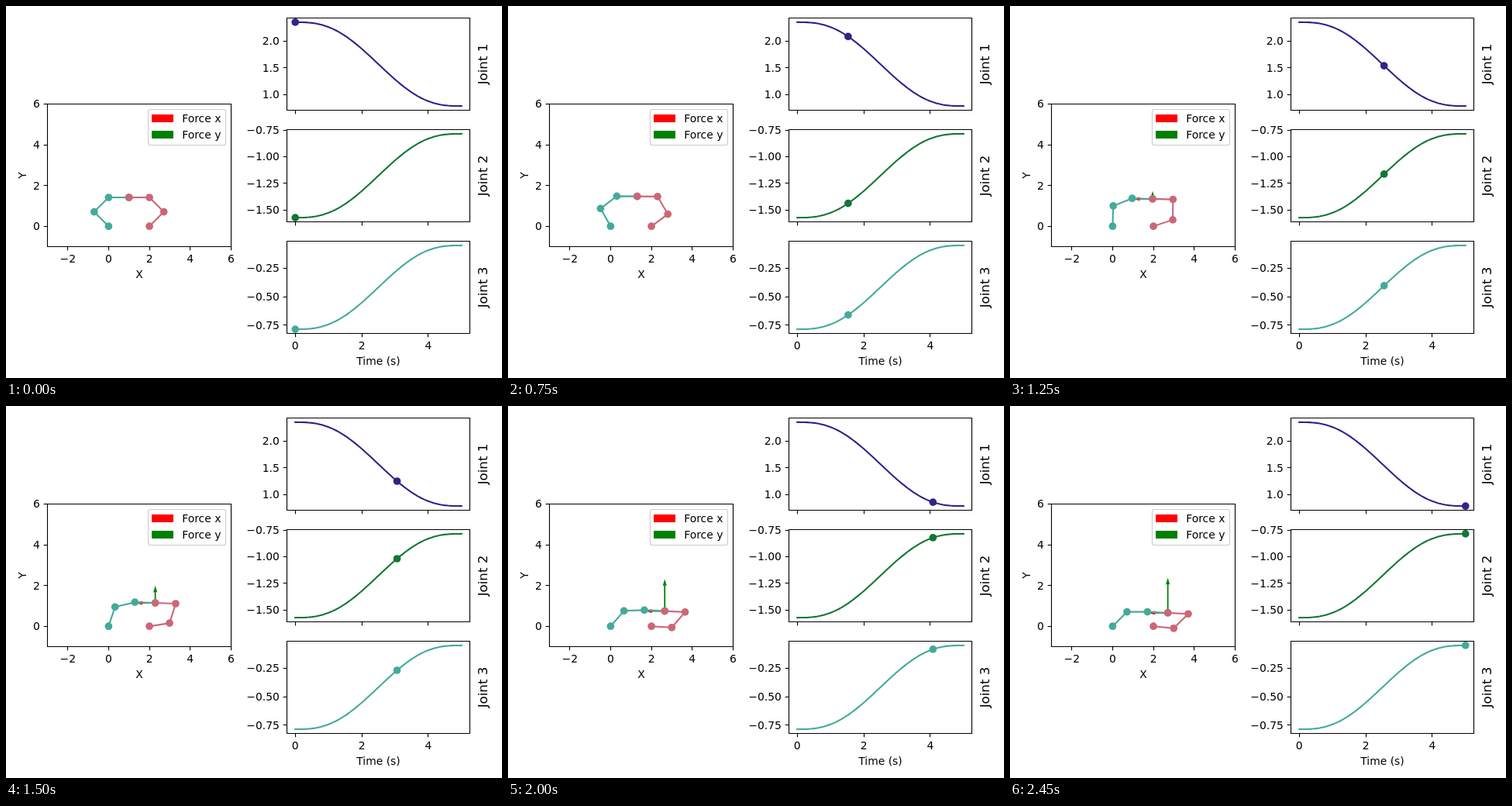
Animation, 640 px wide and 480 px high, one loop 2500 ms. Source, as an HTML page:

```html
<!DOCTYPE html>
<html lang="en">
<head>
<meta charset="utf-8">
<title>Two-arm joint motion</title>
<style>
  html, body { margin: 0; width: 100%; height: 100%; overflow: hidden; background: #fff; }
  svg { display: block; width: 640px; height: 480px; }
  text { font-family: "DejaVu Sans", sans-serif; font-size: 13.89px; }
  .axis { fill: none; stroke: #000; stroke-width: 1.11; }
  .line { fill: none; stroke-width: 2.08; stroke-linejoin: round; stroke-linecap: square; }
</style>
</head>
<body>
<svg id="stage" viewBox="0 0 640 480"></svg>
<script>
const NS = 'http://www.w3.org/2000/svg';
const stage = document.getElementById('stage');
const STEPS = 50, STEP_MS = 50, DURATION = 5;
const TEAL = '#44AA99', PINK = '#CC6677';
const { PI, cos, sin, hypot, floor, sqrt, min } = Math;

function add(tag, attrs, text) {
  const el = document.createElementNS(NS, tag);
  for (const key in attrs) el.setAttribute(key, attrs[key]);
  if (text !== undefined) el.textContent = text;
  return stage.appendChild(el);
}

const snap = v => floor(v) + 0.5;
const axisPath = d => add('path', { class: 'axis', d });
const label = (x, y, text, anchor = 'middle') => add('text', { x, y, 'text-anchor': anchor }, text);
const line = color => add('path', { class: 'line', stroke: color });
const dot = color => add('circle', { r: 4.86, fill: color });
const pathOf = pts => 'M' + pts.map(p => p[0].toFixed(2) + ' ' + p[1].toFixed(2)).join('L');
const place = (el, [x, y]) => { el.setAttribute('cx', x); el.setAttribute('cy', y); };
const number = (v, digits) => v.toFixed(digits).replace('-', '\u2212');

function sideText(x, y, text, size) {
  const el = add('text', { 'text-anchor': 'middle', transform: `translate(${x} ${y}) rotate(-90)` }, text);
  el.style.fontSize = size + 'px';
}

function xTicks(values, toX, y, labelled = true) {
  for (const v of values) {
    axisPath(`M${snap(toX(v))} ${y}v4.86`);
    if (labelled) label(toX(v), y + 20, number(v, 0));
  }
}

function yTicks(values, toY, x, digits) {
  for (const v of values) {
    axisPath(`M${x} ${snap(toY(v))}h-4.86`);
    label(x - 9.7, toY(v) + 5, number(v, digits), 'end');
  }
}

// Minimum-jerk profile from 0 to 1
const ease = u => u * u * u * (10 - 15 * u + 6 * u * u);

const joints = [
  { from: 0.75 * PI, to: 0.25 * PI, color: '#332288', top: 15.5, ticks: [2, 1.5, 1], digits: 1 },
  { from: -0.5 * PI, to: -0.25 * PI, color: '#117733', top: 159.5, ticks: [-0.75, -1, -1.25, -1.5], digits: 2 },
  { from: -0.25 * PI, to: -0.05, color: TEAL, top: 303.5, ticks: [-0.25, -0.5, -0.75], digits: 2 }
];
const angleAt = (j, s) => j.from + (j.to - j.from) * s;

// Joint plots
const PLOT = { x: 362.5, w: 236, h: 119 };
const timeX = t => PLOT.x + PLOT.w * (0.5 + t / DURATION * 10) / 11;

joints.forEach((j, i) => {
  const high = Math.max(j.from, j.to), range = Math.abs(j.to - j.from);
  j.y = v => j.top + PLOT.h * (0.5 + (high - v) / range * 10) / 11;
  const bottom = j.top + PLOT.h;
  xTicks([0, 2, 4], timeX, bottom, i === 2);
  yTicks(j.ticks, j.y, PLOT.x, j.digits);
  const curve = Array.from({ length: STEPS }, (_, k) => {
    const u = k / (STEPS - 1);
    return [timeX(u * DURATION), j.y(angleAt(j, ease(u)))];
  });
  line(j.color).setAttribute('d', pathOf(curve));
  axisPath(`M${PLOT.x} ${j.top}h${PLOT.w}v${PLOT.h}h${-PLOT.w}z`);
  sideText(621, j.top + PLOT.h / 2, 'Joint ' + (i + 1), 16.67);
  j.dot = dot(j.color);
});
label(480.5, 463, 'Time (s)');

// Arm view
const armX = x => 132.4 + 26.33 * x;
const armY = y => 284.2 - 26.29 * y;
const toStage = ([x, y]) => [armX(x), armY(y)];

xTicks([-2, 0, 2, 4, 6], armX, 310.5);
yTicks([0, 2, 4, 6], armY, 53.5, 0);
label(171.9, 351, 'X');
sideText(25.5, 218.5, 'Y', 13.89);

const arrowX = add('path', { fill: '#f00' });
const arrowY = add('path', { fill: '#008000' });
const arms = [TEAL, PINK].map(color => ({ line: line(color), dots: [0, 1, 2, 3].map(() => dot(color)) }));

axisPath('M53.5 126.5h237v184h-237z');
add('rect', { x: 183.5, y: 133.5, width: 100, height: 46, rx: 2.8, fill: '#fff', 'fill-opacity': 0.8, stroke: '#ccc', 'stroke-width': 1.1 });
[['Force x', '#f00', 150], ['Force y', '#008000', 171]].forEach(([name, fill, y]) => {
  add('rect', { x: 188, y: y - 10, width: 28, height: 10, fill });
  label(227.2, y, name, 'start');
});

// Left arm by forward kinematics, unit links
function leftArm(angles) {
  const pts = [[0, 0]];
  let a = 0;
  for (const q of angles) {
    a += q;
    const [x, y] = pts[pts.length - 1];
    pts.push([x + cos(a), y + sin(a)]);
  }
  return { pts, tilt: a };
}

// Right arm meets the left tip head-on, elbow outward
function rightArm([x, y], tilt) {
  const wx = x + cos(tilt), wy = y + sin(tilt);
  const dx = wx - 2, dy = wy, d = hypot(dx, dy);
  const bend = sqrt(1 - d * d / 4) / d;
  return [[2, 0], [2 + dx / 2 + dy * bend, dy / 2 - dx * bend], [wx, wy], [x, y]];
}

function drawArrow(el, [x, y], length, degrees) {
  const w = 1.78, k = min(1, length / (5 * w));
  const head = 5 * w * k, notch = length - 4.5 * w * k, half = w * k / 2, wing = 1.5 * w * k;
  const back = length - head;
  el.setAttribute('d', `M0 ${-half}H${notch}L${back} ${-wing}L${length} 0L${back} ${wing}L${notch} ${half}H0z`);
  el.setAttribute('transform', `translate(${x} ${y}) rotate(${degrees})`);
}

function draw(step) {
  const u = step / (STEPS - 1), s = ease(u);
  const angles = joints.map(j => angleAt(j, s));
  joints.forEach((j, i) => place(j.dot, [timeX(u * DURATION), j.y(angles[i])]));

  const left = leftArm(angles), tip = left.pts[3];
  [left.pts, rightArm(tip, left.tilt)].forEach((pts, i) => {
    const spots = pts.map(toStage);
    arms[i].line.setAttribute('d', pathOf(spots));
    arms[i].dots.forEach((el, k) => place(el, spots[k]));
  });

  // Contact forces act in the second half
  const contact = u >= 0.5;
  const lift = 10.2 + (s - 0.519) * (69.8 + 25.8 * (s - 0.88));
  drawArrow(arrowX, toStage(tip), contact ? 25 : 0, 180);
  drawArrow(arrowY, toStage(tip), contact ? lift : 0, -90);
}

function tick() {
  draw(floor(performance.now() / STEP_MS) % STEPS);
  requestAnimationFrame(tick);
}
tick();
</script>
</body>
</html>
```
